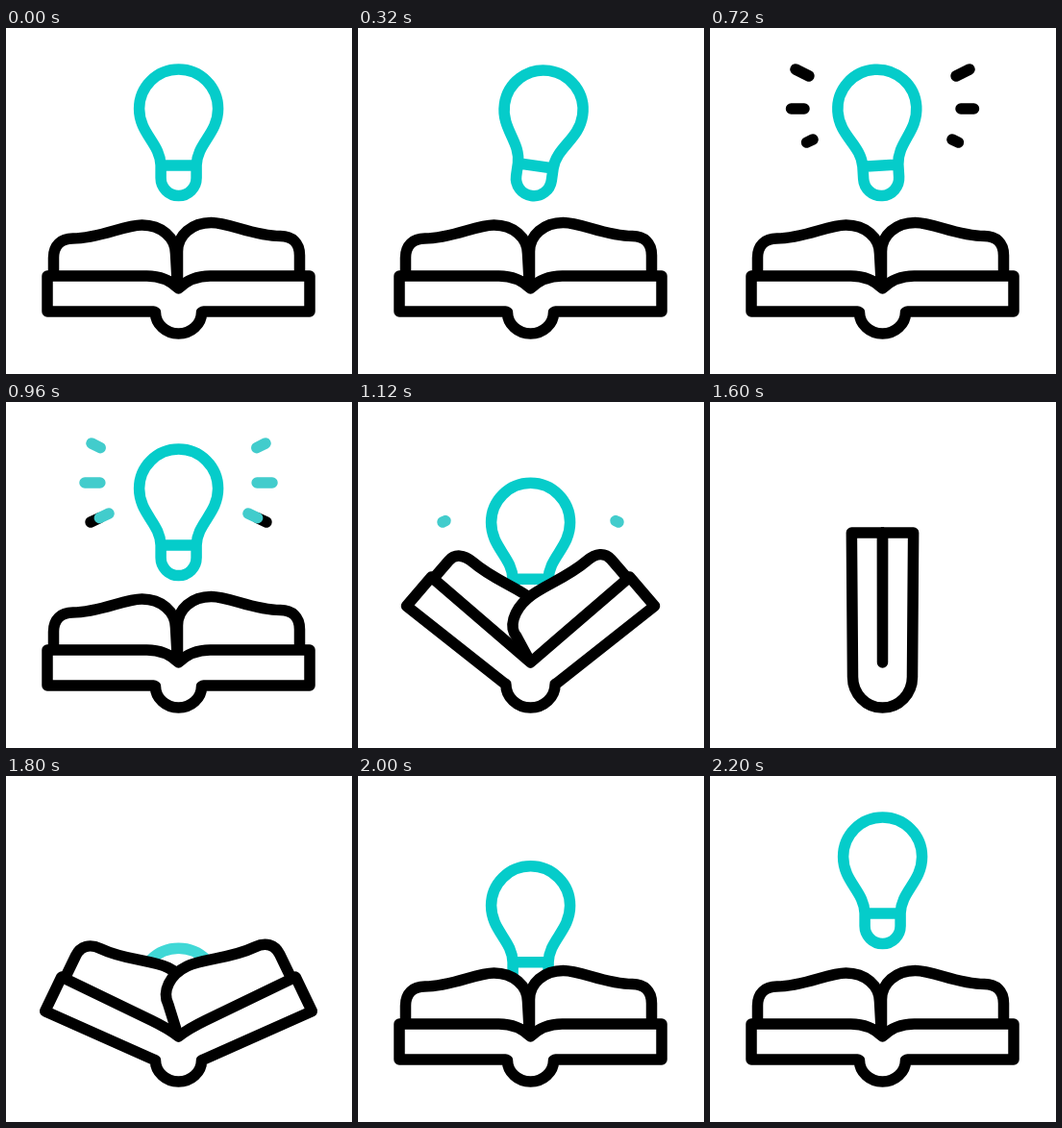
An HTML page with a canvas for the animation above (2400 ms loop, 360x360 px).

```html
<!DOCTYPE html>
<html lang="en">
<head>
<meta charset="utf-8">
<title>Book and bulb</title>
<style>
html, body { margin: 0; width: 100%; height: 100%; overflow: hidden; background: #fff; }
canvas { display: block; width: 360px; height: 360px; }
</style>
</head>
<body>
<canvas id="stage" width="360" height="360"></canvas>
<script>
const ctx = document.getElementById('stage').getContext('2d');
const LOOP = 2400, RAD = Math.PI / 180;
const TEAL = '#05ccca', RAY_TEAL = '#42cccc';
const CX = 179.5, HINGE_Y = 271;

const lerp = (a, b, k) => a + (b - a) * k;
const ramp = (t, from, to) => Math.min(1, Math.max(0, (t - from) / (to - from)));
const ease = k => (1 - Math.cos(Math.PI * k)) / 2;

// Eased value from [time, value] keys
function keyed(t, keys) {
  let value = keys[0][1];
  for (let i = 1; i < keys.length; i++) {
    const [t0, v0] = keys[i - 1], [t1, v1] = keys[i];
    if (t >= t0) value = lerp(v0, v1, ease(ramp(t, t0, t1)));
  }
  return value;
}

function rotateAbout(x, y, degrees) {
  ctx.translate(x, y);
  ctx.rotate(degrees * RAD);
  ctx.translate(-x, -y);
}

function drawBulb(t) {
  const rising = t > 1500;
  const drop = rising ? 143 * (1 - ease(ramp(t, 1740, 2180)))
                      : 6.12e-4 * Math.max(0, t - 861) ** 2;
  const alpha = rising ? ramp(t, 1740, 1820) : 1 - ramp(t, 1120, 1240);
  if (!alpha) return;
  ctx.save();
  ctx.globalAlpha = alpha;
  ctx.translate(-0.4, drop);
  rotateAbout(180, 180, keyed(t, [[0, 0], [280, 9], [560, -9], [840, 0]]));
  ctx.strokeStyle = TEAL;
  ctx.beginPath();
  ctx.moveTo(161.5, 143);
  ctx.bezierCurveTo(161, 120, 139, 110, 139, 84);
  ctx.arc(180, 84, 41, Math.PI, 0);
  ctx.bezierCurveTo(221, 110, 199, 120, 198.5, 143);
  ctx.lineTo(198.5, 156);
  ctx.arc(180, 156, 18.5, 0, Math.PI);
  ctx.closePath();
  ctx.lineTo(198.5, 143);
  ctx.stroke();
  ctx.restore();
}

// Inner end, outer end, start of black and teal strokes
const RAYS = [
  [103, 50, 89, 43, 580, 800],
  [98, 84, 82, 84, 620, 840],
  [107, 116, 88, 125, 680, 900]
];

function drawRays(t) {
  for (const [x0, y0, x1, y1, black, teal] of RAYS) {
    const head = ramp(t, black, black + 120);
    const cover = ramp(t, teal, teal + 120);
    const tail = ramp(t, teal + 120, teal + 240);
    const segment = (from, to, color) => {
      if (to <= from) return;
      ctx.strokeStyle = color;
      ctx.beginPath();
      for (const side of [-1, 1]) {
        const px = k => CX + side * (CX - lerp(x0, x1, k));
        ctx.moveTo(px(from), lerp(y0, y1, from));
        ctx.lineTo(px(to), lerp(y0, y1, to));
      }
      ctx.stroke();
    };
    segment(cover, head, '#000');
    segment(tail, cover, RAY_TEAL);
  }
}

function drawBook(t) {
  const deg = keyed(t, [[980, 0], [1280, 90], [1596, 90], [1916, 0]]);
  const sin = Math.sin(deg * RAD), cos = Math.cos(deg * RAD);
  const swell = Math.sin(2 * deg * RAD);
  const flat = Math.max(0, 1 - deg / 33);
  const fold = ramp(deg, 26, 90);
  const lift = 13 * flat;
  const thick = 37 + 5 * swell - 5 * deg / 90;
  const edge = 136.5 - 1.5 * fold;
  const spineX = lerp(24, 31, fold), spineY = lerp(296, 286, fold);

  // u runs along a half from the hinge, n stands off its inner face
  const place = (side, u, n) => [CX + side * (u * cos - n * sin), HINGE_Y - u * sin - n * cos];
  const paint = () => { ctx.fill(); ctx.stroke(); };

  ctx.save();
  rotateAbout(180, 300, keyed(t, [[1240, 0], [1340, 5.5], [1470, -5.5], [1600, 0]]));
  ctx.strokeStyle = '#000';
  ctx.fillStyle = '#fff';

  for (const side of [-1, 1]) {
    const shift = 5.6 * swell - 2 * side * flat;
    const rise = side > 0 ? 2.5 : 0;
    const p = (u, n) => place(side, u + shift, (n + rise) * lerp(0.04, 1, cos));
    ctx.beginPath();
    ctx.moveTo(...p(128, lift));
    ctx.lineTo(...p(128, 32));
    ctx.bezierCurveTo(...p(128, 45), ...p(120, 52), ...p(108, 52));
    ctx.bezierCurveTo(...p(80, 52), ...p(55, 66), ...p(36, 66));
    ctx.bezierCurveTo(...p(16, 66), ...p(1, 53), ...p(1, 36));
    ctx.lineTo(...place(side, -side * flat, 0));
    paint();
  }

  const left = (u, n) => place(-1, u, n), right = (u, n) => place(1, u, n);
  ctx.beginPath();
  ctx.moveTo(...left(0, 0));
  ctx.quadraticCurveTo(...left(13, lift), ...left(33, lift));
  ctx.lineTo(...left(edge, lift));
  ctx.lineTo(...left(edge, lift - thick));
  ctx.lineTo(CX - spineX - 2 * (1 - fold), spineY - 1);
  ctx.ellipse(CX, spineY, spineX, 318 - spineY, 0, Math.PI, 0, true);
  ctx.lineTo(CX + spineX + 2 * (1 - fold), spineY - 1);
  ctx.lineTo(...right(edge, lift - thick));
  ctx.lineTo(...right(edge, lift));
  ctx.lineTo(...right(33, lift));
  ctx.quadraticCurveTo(...right(13, lift), ...right(0, 0));
  ctx.closePath();
  paint();
  ctx.restore();
}

function draw(now) {
  const t = now % LOOP;
  ctx.fillStyle = '#fff';
  ctx.fillRect(0, 0, 360, 360);
  ctx.lineWidth = 11.5;
  ctx.lineCap = ctx.lineJoin = 'round';
  drawBulb(t);
  drawRays(t);
  drawBook(t);
}

const start = performance.now();
function tick() {
  draw(performance.now() - start);
  requestAnimationFrame(tick);
}
tick();
</script>
</body>
</html>
```
